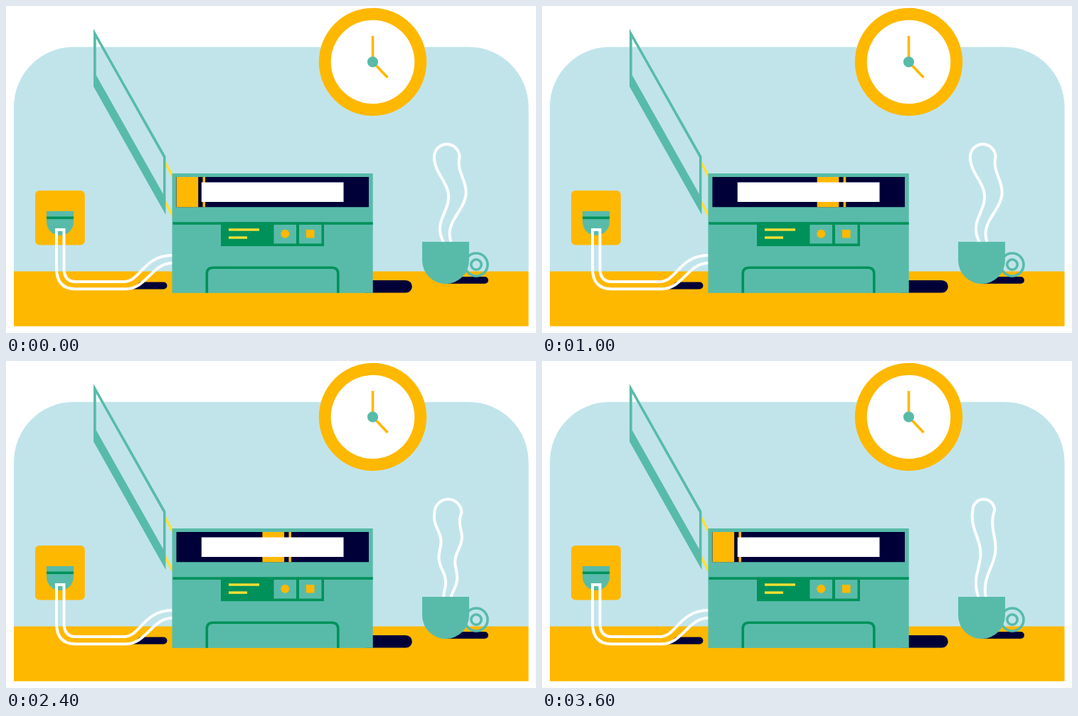
Animation, 745 px wide and 459 px high, one loop 3850 ms. Source, as an HTML page:

```html
<!DOCTYPE html>
<html lang="en">
<head>
<meta charset="utf-8">
<title>Copier on a desk</title>
<style>
  html, body { margin: 0; width: 100%; height: 100%; overflow: hidden; background: #fff; }
  svg { display: block; width: 745px; height: 459px; }
  .yellow { fill: #ffb800; }
  .teal { fill: #58bba9; }
  .green { fill: #00915a; }
  .navy { fill: #000038; }
  .lemon { fill: #ffe033; }
  .white { fill: #fff; }
  .line { fill: none; stroke-width: 3.6; }
  .soft { fill: none; stroke: #fff; stroke-width: 4; stroke-linejoin: round; }
</style>
</head>
<body>
<svg viewBox="0 0 745 459">
  <defs>
    <clipPath id="glass"><rect x="239.5" y="240" width="270.5" height="42.3"/></clipPath>
  </defs>

  <!-- room -->
  <path fill="#c1e4eb" d="M11 373V142A84 84.5 0 0 1 95 57.5H650.5A84 84.5 0 0 1 734.5 142V373Z"/>
  <rect class="yellow" x="11" y="372.5" width="723.5" height="77"/>

  <!-- clock -->
  <circle class="yellow" cx="515.5" cy="78.5" r="75.7"/>
  <circle class="white" cx="515.5" cy="78.5" r="58.8"/>
  <path class="line" stroke="#ffb800" d="M515.5 42V78.5L536.5 100.5"/>
  <circle class="teal" cx="515.5" cy="78.5" r="7.6"/>

  <!-- socket and cable -->
  <rect class="yellow" x="41" y="259" width="69.8" height="76.5" rx="6"/>
  <path class="teal" d="M57 288H95V303A19 19 0 0 1 57 303Z"/>
  <rect class="green" x="57" y="295.5" width="38" height="3.6"/>
  <path class="navy" d="M172 397.5Q181 395 188 387.5H221.5A5 5 0 0 1 221.5 397.5Z"/>
  <path class="soft" style="stroke-linejoin:miter" d="M235 360.5C204 361 198 397.3 168 397.3H98Q71 397.3 71 368V314H81.5V368Q81.5 387 98 387H165C190 387 192 350 235 349.7"/>

  <!-- copier -->
  <path class="line" stroke="#ffe033" d="M223 218.5L235 240.5M223 274L235 295.5"/>
  <path class="teal" fill-rule="evenodd" d="M123 32L224.5 211V293L123 113ZM126.7 45.6L221 212.5V264L126.7 97Z"/>
  <path class="navy" d="M505 385H562A8.8 8.8 0 0 1 562 402.6H505Z"/>
  <rect class="teal" x="233.5" y="235" width="282.2" height="167.8"/>
  <g clip-path="url(#glass)">
    <rect class="navy" x="239" y="240" width="271" height="43"/>
    <g id="lamp" class="yellow">
      <rect y="240" width="30.7" height="43"/>
      <rect x="37" y="240" width="3.6" height="43"/>
    </g>
  </g>
  <rect class="white" x="274.8" y="247.5" width="199.7" height="27.5"/>
  <rect class="green" x="234.5" y="303.3" width="281.2" height="3.6"/>
  <rect class="green" x="302" y="303.5" width="145" height="33.6"/>
  <rect class="teal" x="376.5" y="307" width="31.5" height="26.5"/>
  <rect class="teal" x="412" y="307" width="31.5" height="26.5"/>
  <rect class="lemon" x="313" y="312.3" width="43" height="3.4"/>
  <rect class="lemon" x="313" y="323.4" width="26" height="3.4"/>
  <circle class="yellow" cx="392.3" cy="319.7" r="6"/>
  <rect class="yellow" x="422" y="314" width="11.5" height="11.5"/>
  <path class="line" stroke="#00915a" d="M282.3 402.8V376Q282.3 367.2 291 367.2H458Q466.8 367.2 466.8 376V402.8"/>

  <!-- cup -->
  <path id="steam" class="soft"/>
  <path class="navy" d="M618 380H673A4.9 4.9 0 0 1 673 389.8H618Z"/>
  <g class="line" stroke="#58bba9">
    <circle cx="661" cy="363" r="16"/>
    <circle cx="661" cy="363" r="7.2"/>
  </g>
  <path class="teal" d="M585 331H651V357A33 33 0 0 1 585 357Z"/>
</svg>
<script>
  const LOOP = 3850, STEP = 50, LAST = 3600;
  const lamp = document.getElementById('lamp');
  const steam = document.getElementById('steam');

  // A plume widens from its foot to a round head while its middle sways as a cosine.
  // peak and wave are fractions of the plume's height.
  function plume({ x, lean, sway, peak, wave, head }) {
    const foot = 334, top = 194 + head, left = [], right = [];
    for (let h = -0.04; h < 1.01; h += 0.04) {
      const mid = x + lean * h + sway * Math.cos(2 * Math.PI * (h - peak) / wave);
      const half = 5 + (head - 5) * h;
      const y = foot + (top - foot) * h;
      left.push([mid - half, y]);
      right.unshift([mid + half, y]);
    }
    return `M${left.join('L')}A${head} ${head} 0 0 1 ${right.join('L')}`;
  }
  const wide = plume({ x: 624.5, lean: 3, sway: 8, peak: 0.56, wave: 0.82, head: 17.8 });
  const slim = plume({ x: 620.5, lean: 3.5, sway: 4.5, peak: 0.53, wave: 0.75, head: 15.3 });
  const wavy = plume({ x: 623, lean: 0, sway: 3, peak: 0.22, wave: 0.47, head: 19 });

  function steamPath(t) {
    const m = t % 497;
    return m < 100 ? wide : m < 360 ? slim : wavy;
  }

  // Steady sweep to the right, short rest, slightly faster sweep back
  function lampX(t) {
    const out = t / 1597, back = (3161 - t) / 1479;
    return 239.5 + 235 * Math.max(0, Math.min(out, 1, back));
  }

  function draw(now) {
    const t = Math.min(LAST, Math.floor(now % LOOP / STEP) * STEP);
    lamp.setAttribute('transform', `translate(${lampX(t)} 0)`);
    steam.setAttribute('d', steamPath(t));
  }

  let start;
  function tick(now) {
    start ??= now;
    draw(now - start);
    requestAnimationFrame(tick);
  }
  draw(0);
  requestAnimationFrame(tick);
</script>
</body>
</html>
```
